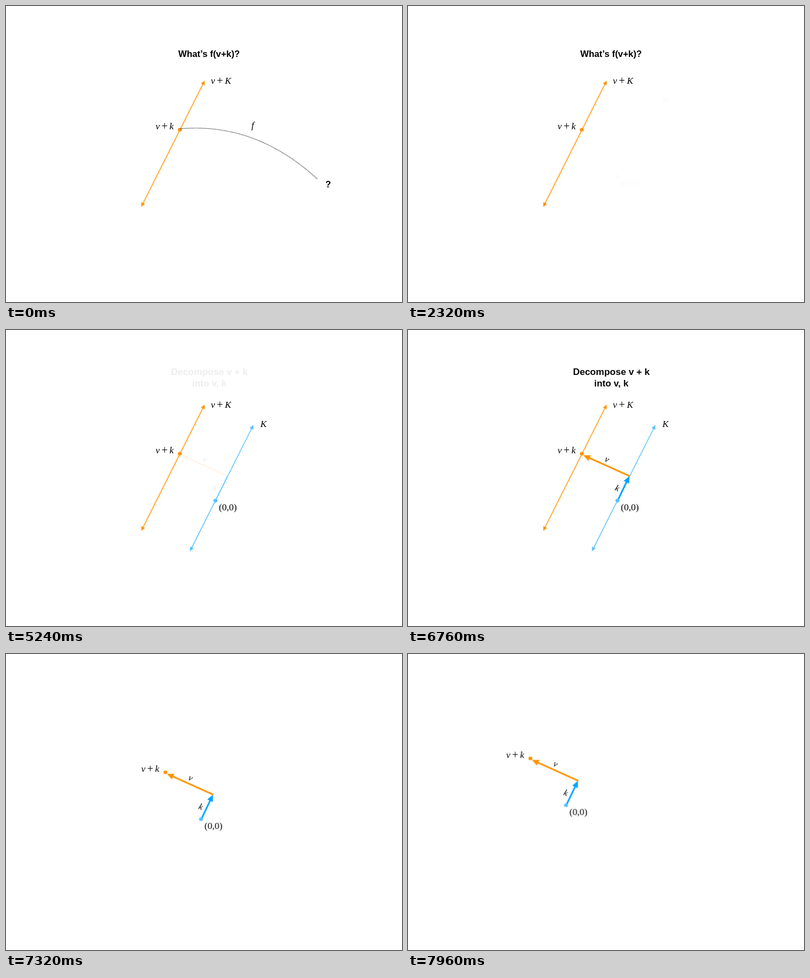
An HTML page for the animation above (8 s loop, 720 by 540 pixels).

```html
<!DOCTYPE html>
<html lang="en">
<head>
<meta charset="utf-8">
<title>Decomposing v + k</title>
<style>
  html, body { margin: 0; width: 100%; height: 100%; overflow: hidden; background: #fff; }
  svg { display: block; width: 720px; height: 540px; }

  .title { font: bold 16.4px "Liberation Sans", Arial, sans-serif; text-anchor: middle; }
  .math { font: italic 17px "Liberation Serif", "Times New Roman", serif; }
  .roman { font-style: normal; }
  .plus { font-style: normal; font-size: 20px; }
  .orange { color: #ff9300; }
  .sky { color: #56c1ff; }
  .blue { color: #00a2ff; }
  .ink { fill: currentColor; stroke: none; }
  .line { fill: none; stroke: currentColor; stroke-width: 1.5; }
  .bold { stroke-width: 3; }

  /* Every part shares one 8 s loop */
  .map, .question, .kernel, .split, .leaving, .moving { animation: 8s linear infinite; }
  .map { animation-name: map; }
  .question { animation-name: question; }
  .kernel { animation-name: kernel; }
  .split { animation-name: split; }
  .leaving { animation-name: leaving; }
  .moving { animation-name: moving; }

  @keyframes map { 0%, 13.06% { opacity: 1 } 18.94%, 100% { opacity: 0 } }
  @keyframes kernel { 0%, 28.88% { opacity: 0 } 34.88%, 100% { opacity: 1 } }
  @keyframes question { 0%, 49.06% { opacity: 1 } 54.94%, 100% { opacity: 0 } }
  @keyframes split { 0%, 65.08% { opacity: 0 } 71%, 100% { opacity: 1 } }
  @keyframes leaving { 0%, 84.38% { opacity: 1 } 90.38%, 100% { opacity: 0 } }

  /* Sine ease-in, then the nearly straight middle of the curve */
  @keyframes moving {
    0% { transform: none }
    84.5% { transform: translate(0, 0); animation-timing-function: cubic-bezier(.47, 0, .745, .715) }
    97% { transform: translate(-71.5px, -27px) }
    100% { transform: translate(-97.8px, -36.9px) }
  }
</style>
</head>
<body>
<svg viewBox="0 0 720 540">
  <defs>
    <path id="head" class="ink" d="M0 0L-8-3.7V3.7Z"/>
    <path id="bigHead" class="ink" d="M0 0L-12.5-5.6V5.6Z"/>
    <g id="axis" transform="rotate(-63.4)">
      <path class="line" d="M5 0H252"/>
      <use href="#head" x="257.8"/>
      <use href="#head" transform="rotate(180)"/>
    </g>
    <ellipse id="dot" class="ink" rx="3.6" ry="3.2"/>
  </defs>

  <g class="leaving">
    <use href="#axis" class="orange" transform="translate(245.9 366.5)"/>
    <text class="math" x="372.5" y="142">v<tspan class="plus" dx="3.2" dy="1.4">+</tspan><tspan dx="3.4" dy="-1.4">K</tspan></text>
    <g class="kernel">
      <use href="#axis" class="sky" transform="translate(334.4 403.8)"/>
      <text class="math" x="462.6" y="177">K</text>
    </g>
    <g class="split title">
      <text x="369.7" y="82" font-size="17.05">Decompose v + k</text>
      <text x="369.7" y="103" font-size="16.8">into v, k</text>
    </g>
  </g>

  <text class="question title" x="369.2" y="93">What’s f(v+k)?</text>

  <g class="moving">
    <text class="math" x="272" y="225">v<tspan class="plus" dx="3.3" dy="1.4">+</tspan><tspan dx="3.1" dy="-1.4">k</tspan></text>
    <use href="#dot" class="orange" transform="translate(316 225.7)"/>
    <g class="split">
      <g class="blue" transform="translate(381.1 311.3) rotate(-64.4)">
        <path class="line bold" d="M0 0H39"/>
        <use href="#bigHead" x="49.8"/>
      </g>
      <g class="orange" transform="translate(403.3 266.6) rotate(204.3)">
        <path class="line bold" d="M0 0H82"/>
        <use href="#bigHead" x="92.8"/>
      </g>
      <g class="math" text-anchor="middle">
        <text transform="translate(378.6 293.4) rotate(22)" font-size="16">k</text>
        <text transform="translate(359.8 240.4) rotate(24)" font-size="16">v</text>
      </g>
    </g>
    <g class="kernel">
      <use href="#dot" class="sky" transform="translate(380.8 311.3)"/>
      <text class="math roman" x="387.1" y="329.3">(0,0)</text>
    </g>
  </g>

  <g class="map">
    <path class="line" d="M316.5 224Q453.5 212 566 315.5" style="stroke-width:1.2" stroke-dasharray="1.2 1.3"/>
    <text class="math" x="446.2" y="223.3">f</text>
    <text class="title" x="585.7" y="331" font-size="17">?</text>
  </g>
</svg>
</body>
</html>
```
